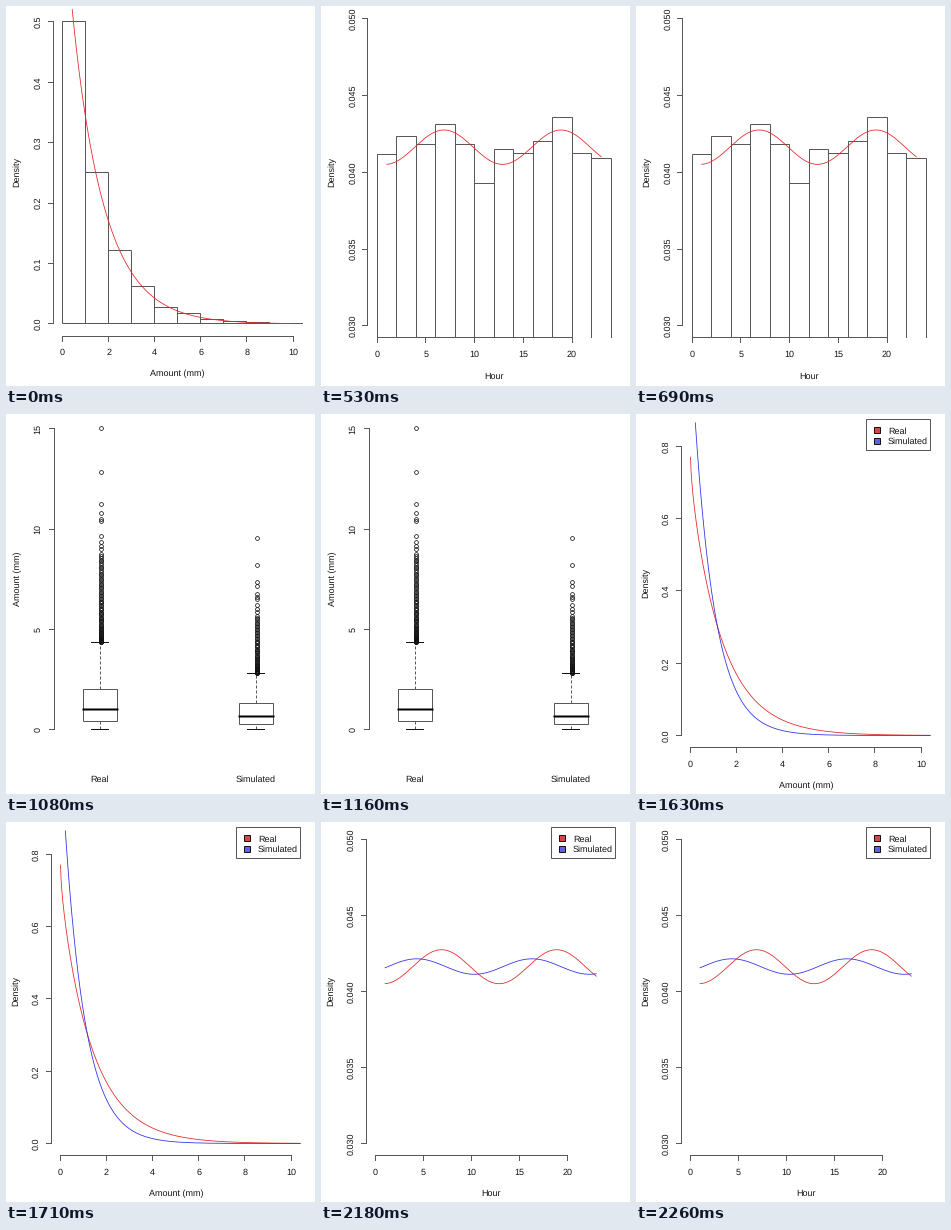
These frames come from a looping animation (309x380 px, 2.72 s). A matplotlib script:

```python
import numpy as np
import matplotlib.pyplot as plt
from matplotlib.animation import FuncAnimation
from matplotlib.patches import Rectangle
from math import gamma

W, H, DPI = 309, 380, 100
LOOP, STEP = 2720, 10
STARTS = [0, 530, 1080, 1630, 2180]
PT = 72 / DPI  # points per pixel
INK, TEXT, RED, BLUE = "#585858", "#141414", "#e42828", "#3030e4"

plt.rcParams.update({"font.family": "Liberation Sans", "text.hinting": "none",
                     "text.hinting_factor": 1, "path.snap": False})
fig = plt.figure(figsize=(W / DPI, H / DPI), dpi=DPI, facecolor="white")


def slide():
    ax = fig.add_axes([0, 0, 1, 1])
    ax.set(xlim=(0, W), ylim=(H, 0))
    ax.axis("off")
    return ax


def col(x):
    """Centre of the pixel column at x."""
    return np.floor(np.round(x, 3)) + 0.5


def row(y):
    """Centre of the pixel row that ends at or after y."""
    return np.ceil(np.round(y, 3)) - 0.5


def line(ax, x, y, color=INK, lw=1.0, **kw):
    ax.plot(col(x), row(y), color=color, lw=lw * PT,
            solid_capstyle="projecting", solid_joinstyle="miter", **kw)


def label(ax, x, y, s, up=False, ha="center"):
    """Place text by the middle of its capitals."""
    dx, dy = (2.6, 0) if up else (0, 2.6)
    ax.text(x + dx, y + dy, s, size=8.8 * PT, color=TEXT, ha=ha, va="baseline",
            rotation=90 if up else 0, rotation_mode="anchor")


def box(ax, x0, y0, x1, y1, fill="none", edge=INK):
    x0, x1, y0, y1 = col(x0), col(x1), row(y0), row(y1)
    ax.add_patch(Rectangle((x0, y0), x1 - x0, y1 - y0, fc=fill, ec=edge, lw=PT))


def scale(v0, p0, v1, p1):
    return lambda v: p0 + (np.asarray(v) - v0) * (p1 - p0) / (v1 - v0)


def x_axis(ax, sx, ticks, y, text_y):
    line(ax, sx([ticks[0], ticks[-1]]), [y, y])
    for t in ticks:
        line(ax, [sx(t)] * 2, [y, y + 5])
        label(ax, sx(t), text_y, str(t))


def y_axis(ax, sy, ticks, x, fmt, text_x):
    line(ax, [x, x], sy([ticks[0], ticks[-1]]))
    for t in ticks:
        line(ax, [x - 5, x], [sy(t)] * 2)
        label(ax, text_x, sy(t), fmt % t, up=True)


def curve(ax, sx, sy, f, lo, hi, color, top=0):
    x = np.linspace(lo, hi, 900)
    y = sy(f(x))
    keep = y >= top
    ax.plot(sx(x[keep]), y[keep], color=color, lw=0.8 * PT)


def legend(ax):
    box(ax, 230, 6, 294, 37)
    for y, color, name in [(17, "#d04848", "Real"), (27.5, "#6060ec", "Simulated")]:
        box(ax, 238, y - 3, 244, y + 3, color, TEXT)
        label(ax, 252, y, name, ha="left")


def real_amount(x):
    k, rate = 0.97, 0.68
    return rate**k / gamma(k) * x**(k - 1) * np.exp(-rate * x)


def sim_amount(x):
    return 1.1 * np.exp(-1.1 * x)


def daily(mean, amp, peak):
    return lambda h: mean + amp * np.cos(2 * np.pi * (h - peak) / 12)


real_hour = daily(0.04165, 0.00112, 6.87)
sim_hour = daily(0.04166, 0.00051, 4.3)
HOUR_TICKS = np.linspace(0.03, 0.05, 5)


def amount_histogram():
    ax = slide()
    sx, sy = scale(0, 56.5, 10, 287), scale(0, 318, 0.5, 16)
    heights = [.501, .251, .122, .062, .028, .018, .0075, .0035, .002, .0005]
    for i, h in enumerate(heights):
        box(ax, sx(i), sy(h), sx(i + 1), sy(0))
    line(ax, [sx(10), 296], [sy(0)] * 2)
    curve(ax, sx, sy, real_amount, 0.01, 10, RED, top=2)
    x_axis(ax, sx, range(0, 11, 2), 330.5, 346.5)
    y_axis(ax, sy, np.linspace(0, 0.5, 6), 47, "%.1f", 32)
    label(ax, 171.5, 367.5, "Amount (mm)")
    label(ax, 11, 166, "Density", up=True)
    return ax


def hour_histogram():
    ax = slide()
    sx, sy = scale(0, 56, 20, 251), scale(0.03, 320, 0.05, 13)
    tops = [149, 130.5, 139, 119, 139, 177.5, 144, 147.5, 135.5, 112, 147.5, 153]
    for i, top in enumerate(tops):
        a, b = sx(2 * i), sx(2 * i + 2)
        line(ax, [a, a, b, b], [332, top, top, 332])
    curve(ax, sx, sy, real_hour, 1, 23, RED)
    x_axis(ax, sx, range(0, 21, 5), 332, 348.5)
    y_axis(ax, sy, HOUR_TICKS, 46, "%.3f", 31.5)
    label(ax, 173, 370, "Hour")
    label(ax, 10.5, 166, "Density", up=True)
    return ax


def box_plot(ax, x, low, q1, median, q3, high, outliers):
    for a, b in [(low, q1), (q3, high)]:
        line(ax, [x, x], [a, b], ls=(0, (3, 2)))
    for y in (low, high):
        line(ax, [x - 8.5, x + 8.5], [y, y], TEXT)
    box(ax, x - 17, q3, x + 17, q1)
    line(ax, [x - 17, x + 17], [median] * 2, "black", 2)
    ax.plot(np.full(len(outliers), x + 0.5), outliers, "o", ms=3.8 * PT, mfc="none",
            mec="#101010", mew=0.75 * PT)


def dense(bottom, span, n):
    return bottom - span * np.linspace(0, 1, n)**1.5


def amount_boxes():
    ax = slide()
    sy = scale(0, 316, 15, 15)
    y_axis(ax, sy, range(0, 16, 5), 48, "%d", 32)
    label(ax, 12, 165, "Amount (mm)", up=True)
    box_plot(ax, 94, 316, 308, 296, 276, 229,
             np.r_[14, 58, 90, 99, 105, 107, 122, 128, 132, 135, dense(228, 88, 72)])
    box_plot(ax, 250, 316, 310.5, 303, 290, 259.5,
             np.r_[123.5, 151, 168, 172, 180, 183, 185, 191, 195, 198, dense(259, 57, 52)])
    label(ax, 94, 365.5, "Real")
    label(ax, 250, 365.5, "Simulated")
    return ax


def amount_curves():
    ax = slide()
    sx, sy = scale(0, 54.3, 10, 285), scale(0, 321.5, 0.8, 32.5)
    curve(ax, sx, sy, real_amount, 0.01, 10.4, RED, top=5)
    curve(ax, sx, sy, sim_amount, 0.01, 10.4, BLUE, top=5)
    x_axis(ax, sx, range(0, 11, 2), 333.5, 350.5)
    y_axis(ax, sy, np.linspace(0, 0.8, 5), 45, "%.1f", 29.5)
    label(ax, 170, 371.5, "Amount (mm)")
    label(ax, 9.5, 169.5, "Density", up=True)
    legend(ax)
    return ax


def hour_curves():
    ax = slide()
    sx, sy = scale(0, 54.5, 20, 246.5), scale(0.03, 321.5, 0.05, 18)
    curve(ax, sx, sy, real_hour, 1, 23, RED)
    curve(ax, sx, sy, sim_hour, 1, 23, BLUE)
    x_axis(ax, sx, range(0, 21, 5), 333.5, 350)
    y_axis(ax, sy, HOUR_TICKS, 45, "%.3f", 29.5)
    label(ax, 170, 371, "Hour")
    label(ax, 9.5, 169.5, "Density", up=True)
    legend(ax)
    return ax


slides = [amount_histogram(), hour_histogram(), amount_boxes(),
          amount_curves(), hour_curves()]


def update(i):
    current = sum(i * STEP >= s for s in STARTS) - 1
    for k, ax in enumerate(slides):
        ax.set_visible(k == current)
    return slides


anim = FuncAnimation(fig, update, frames=LOOP // STEP, interval=STEP,
                     init_func=lambda: update(0), repeat=True, repeat_delay=0)
plt.show()
```
